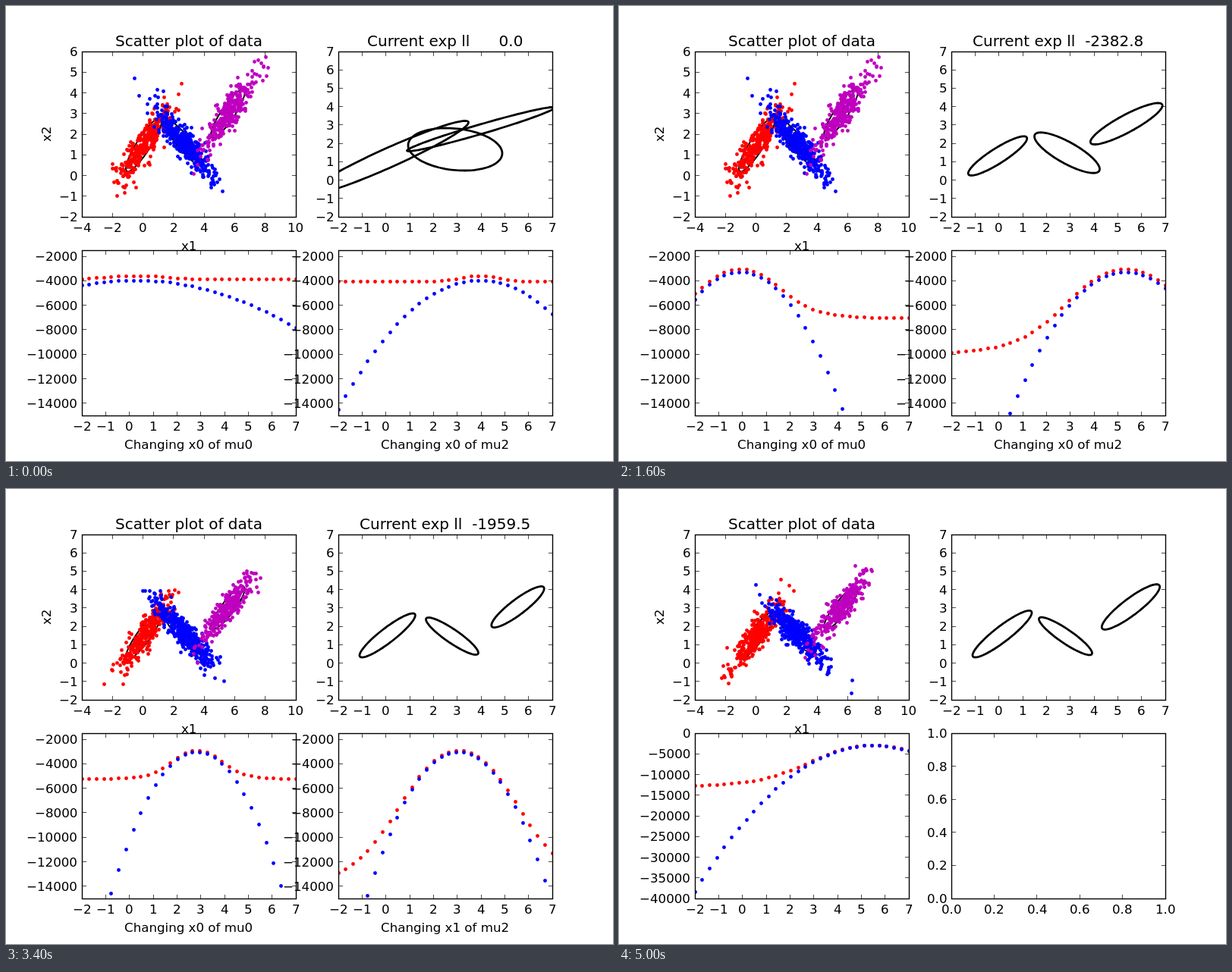
Recreate the animation shown at these times as an HTML page with a canvas. Size 800 px wide and 600 px high, loop 5.2 s.

```html
<!DOCTYPE html>
<html lang="en">
<head>
<meta charset="utf-8">
<title>Mixture fitting</title>
<style>
  html, body { margin: 0; width: 100%; height: 100%; overflow: hidden; background: #fff; }
  canvas { display: block; width: 800px; height: 600px; }
</style>
</head>
<body>
<canvas id="stage" width="800" height="600"></canvas>
<script>
const ctx = document.getElementById('stage').getContext('2d');
const STEP = 200, STEPS = 26;
const RED = '#f00', BLUE = '#00f', MAGENTA = '#bf00bf';
const FONT = '"DejaVu Sans", sans-serif';

// Ellipses are [centre x, centre y, half width, half height, correlation] in pixels.
// A fitted component keeps its place and slope and only varies in size.
const fitRed = w => [466 + w, 222 - .79 * w, w, .79 * w, -.91];
const fitBlue = w => [553.5 + w, 194, w, .71 * w, .9];
const fitMagenta = w => [674.5, 155.5, w, .78 * w, -.89];
const settled = (r, b, m) => [fitRed(r), fitBlue(b), fitMagenta(m)];

// Curves are [centre, top, bend, gap, depth]: a parabola, and a copy raised by
// the gap that levels off at the depth.
const runs = [
  {
    to: 12, top: 6, labels: ['x0 of mu0', 'x0 of mu2'],
    keys: [
      { at: 0, score: -3590,
        ellipses: [[504.5, 200, 105, 48.5, -.958], [592, 189, 62, 28, .19], [625.5, 162.5, 97, 29, -.974]],
        curves: [[.25, 362, 1.38, 6, 5], [3.95, 362, 4.81, 6, 8]] },
      { at: 6, score: -2810.7,
        ellipses: [[499.5, 199, 45, 26, -.87], [589.5, 193, 48, 26.5, .71], [663, 155, 59.5, 27, -.87]],
        curves: [[-.06, 356, 5.57, 7, 19], [5.18, 356, 2.72, 6.5, 50]] },
      { at: 10, score: -1954.8, ellipses: settled(32.5, 38, 35.3),
        curves: [[-.08, 346, 14.2, 1, 112], [5.49, 346, 13.15, 1, 178]] }
    ]
  },
  {
    to: 15, top: 6, labels: ['x0 of mu0', 'x0 of mu2'],
    keys: [
      { at: 13, score: -3593.9,
        ellipses: [[553.5, 188.5, 74.5, 23.5, -.55], [597, 180, 87, 36.5, -.5], [542, 171, 13.5, 3, .85]],
        curves: [[1.3, 365, 4.22, 8, .1], [1.79, 365, .63, 8, 4]] }
    ]
  },
  {
    to: 17, top: 7, labels: ['x0 of mu0', 'x1 of mu2'],
    keys: [
      { at: 16, score: -1959.5, ellipses: settled(36.7, 34.5, 34.7),
        curves: [[2.86, 347, 14.25, 2, 38], [3.07, 347, 12.9, 2, 185]] }
    ]
  },
  {
    to: 24, top: 6, labels: [],
    keys: [
      { at: 18, score: -2883.8,
        ellipses: [fitRed(39.5), [521, 173, 3.5, 4, .9], [628.5, 179.5, 59, 34.5, -.55]],
        curves: [[4.1, 355, 2.98, 2, 600]] }
    ]
  },
  {
    to: 25, top: 7, labels: [], untitled: true, wide: true,
    keys: [
      { at: 25, score: 0, ellipses: settled(39, 35, 38.2),
        curves: [[5.52, 338.5, 3.41, .5, 56]] }
    ]
  }
];

// Data clusters: mean, spread, correlation, count, colour.
const clusters = [
  { mx: .05, my: 1.5, sx: .9, sy: 1, rho: .89, count: 300, color: RED },
  { mx: 2.65, my: 1.6, sx: .95, sy: .85, rho: -.89, count: 400, color: BLUE },
  { mx: 5.55, my: 3, sx: .85, sy: .9, rho: .88, count: 300, color: MAGENTA }
];

function gaussian(seed) {
  const uniform = () => {
    seed = (seed + 0x6D2B79F5) | 0;
    let v = Math.imul(seed ^ (seed >>> 15), 1 | seed);
    v = (v + Math.imul(v ^ (v >>> 7), 61 | v)) ^ v;
    return ((v ^ (v >>> 14)) >>> 0) / 4294967296;
  };
  return () => Math.sqrt(-2 * Math.log(1 - uniform())) * Math.cos(2 * Math.PI * uniform());
}

const range = (a, b, step) => Array.from({ length: Math.round((b - a) / step) + 1 }, (_, i) => a + i * step);
const mix = (a, b, k) => Array.isArray(a) ? a.map((v, i) => mix(v, b[i], k)) : a + (b - a) * k;
const snap = v => Math.floor(v) + .5;

// Text starts on whole pixels; align is the share of the width left of x.
function text(str, x, y, align = .5, size = 16.67) {
  ctx.font = `${size}px ${FONT}`;
  ctx.fillStyle = '#000';
  ctx.fillText(str, Math.round(x - align * ctx.measureText(str).width), Math.round(y));
}

function dot(x, y, color) {
  ctx.fillStyle = color;
  ctx.beginPath();
  ctx.arc(snap(x), snap(y), 2.43, 0, 2 * Math.PI);
  ctx.fill();
}

function ellipse([cx, cy, w, h, rho], width) {
  const s = Math.sqrt(1 - rho * rho);
  ctx.beginPath();
  for (let i = 0; i < 120; i++) {
    const a = i * Math.PI / 60;
    ctx.lineTo(cx + w * Math.cos(a), cy + h * (rho * Math.cos(a) + s * Math.sin(a)));
  }
  ctx.closePath();
  ctx.lineWidth = width;
  ctx.strokeStyle = '#000';
  ctx.stroke();
}

function panel(left, top, xLim, yLim, xTicks, yTicks, digits, draw) {
  const w = 282, h = 218, right = left + w, bottom = top + h;
  const px = x => left + (x - xLim[0]) / (xLim[1] - xLim[0]) * w;
  const py = y => bottom - (y - yLim[0]) / (yLim[1] - yLim[0]) * h;
  const label = v => v.toFixed(digits).replace('-', '\u2212');
  ctx.fillStyle = '#fff';
  ctx.fillRect(left, top, w, h);
  ctx.save();
  ctx.beginPath();
  ctx.rect(left, top, w, h);
  ctx.clip();
  draw(px, py);
  ctx.restore();
  ctx.strokeStyle = '#000';
  ctx.lineWidth = 1.39;
  ctx.strokeRect(left + .5, top + .5, w, h);
  ctx.lineWidth = .7;
  ctx.beginPath();
  const line = (x, y, dx, dy) => { ctx.moveTo(x, y); ctx.lineTo(x + dx, y + dy); };
  for (const v of xTicks) {
    const x = snap(px(v));
    line(x, top + .5, 0, 5.6);
    line(x, bottom + .5, 0, -5.6);
    text(label(v), px(v), bottom + 20);
  }
  for (const v of yTicks) {
    const y = snap(py(v));
    line(left + .5, y, 5.6, 0);
    line(right + .5, y, -5.6, 0);
    text(label(v), left - 5.6, py(v) + 6, 1);
  }
  ctx.stroke();
}

function drawScatter(seed, px, py) {
  const next = gaussian(seed);
  const ux = px(1) - px(0), uy = py(1) - py(0);
  for (const c of clusters)
    ellipse([px(c.mx), py(c.my), 1.3 * c.sx * ux, 1.3 * c.sy * uy, c.rho], 2);
  for (const c of clusters) {
    const s = Math.sqrt(1 - c.rho * c.rho);
    for (let i = 0; i < c.count; i++) {
      const a = next(), b = next();
      dot(px(c.mx + c.sx * a), py(c.my + c.sy * (c.rho * a + s * b)), c.color);
    }
  }
}

function drawCurves([centre, top, bend, gap, depth], px) {
  const xs = range(-2, 7, 9 / 29);
  const drop = x => bend * (x - centre) ** 2;
  for (const x of xs) dot(px(x), top - gap + depth * drop(x) / Math.hypot(depth, drop(x)), RED);
  for (const x of xs) dot(px(x), top + drop(x), BLUE);
}

function pose({ keys }, step) {
  const i = keys.findLastIndex(k => k.at <= step);
  const a = keys[i], b = keys[i + 1] || a;
  const k = a === b ? 0 : (step - a.at) / (b.at - a.at);
  return ['ellipses', 'curves', 'score'].map(name => mix(a[name], b[name], k));
}

function render(step) {
  const index = runs.findIndex(r => step <= r.to);
  const run = runs[index];
  const [ellipses, curves, score] = pose(run, step);
  const units = range(-2, 7, 1);
  ctx.fillStyle = '#fff';
  ctx.fillRect(0, 0, 800, 600);

  panel(100, 60, [-4, 10], [-2, run.top], range(-4, 10, 2), range(-2, run.top, 1), 0,
    (px, py) => drawScatter(11 + index, px, py));
  text('Scatter plot of data', 240.5, 53, .5, 20);
  text('x1', 241, 322);
  ctx.save();
  ctx.translate(59, 169);
  ctx.rotate(-Math.PI / 2);
  text('x2', 0, 0);
  ctx.restore();

  panel(438, 60, [-2, 7], [-2, 7], units, units, 0,
    () => ellipses.forEach(e => ellipse(e, 2.78)));
  // No score exists before the first iteration.
  if (!run.untitled)
    text('Current exp ll ' + (step ? score : 0).toFixed(1).padStart(8), 579, 53, .5, 20);

  const yLim = run.wide ? [-40000, 0] : [-15000, -1500];
  const yTicks = run.wide ? range(-40000, 0, 5000) : range(-14000, -2000, 2000);
  [100, 438].forEach((left, i) => {
    if (curves[i])
      panel(left, 322, [-2, 7], yLim, units, yTicks, 0, px => drawCurves(curves[i], px));
    else
      panel(left, 322, [0, 1], [0, 1], range(0, 1, .2), range(0, 1, .2), 1, () => {});
    if (run.labels[i]) text('Changing ' + run.labels[i], left + 141, 584);
  });
}

let shown = -1;
const start = performance.now();
function tick() {
  const step = Math.floor((performance.now() - start) / STEP) % STEPS;
  if (step !== shown) render(shown = step);
  requestAnimationFrame(tick);
}
tick();
</script>
</body>
</html>
```
